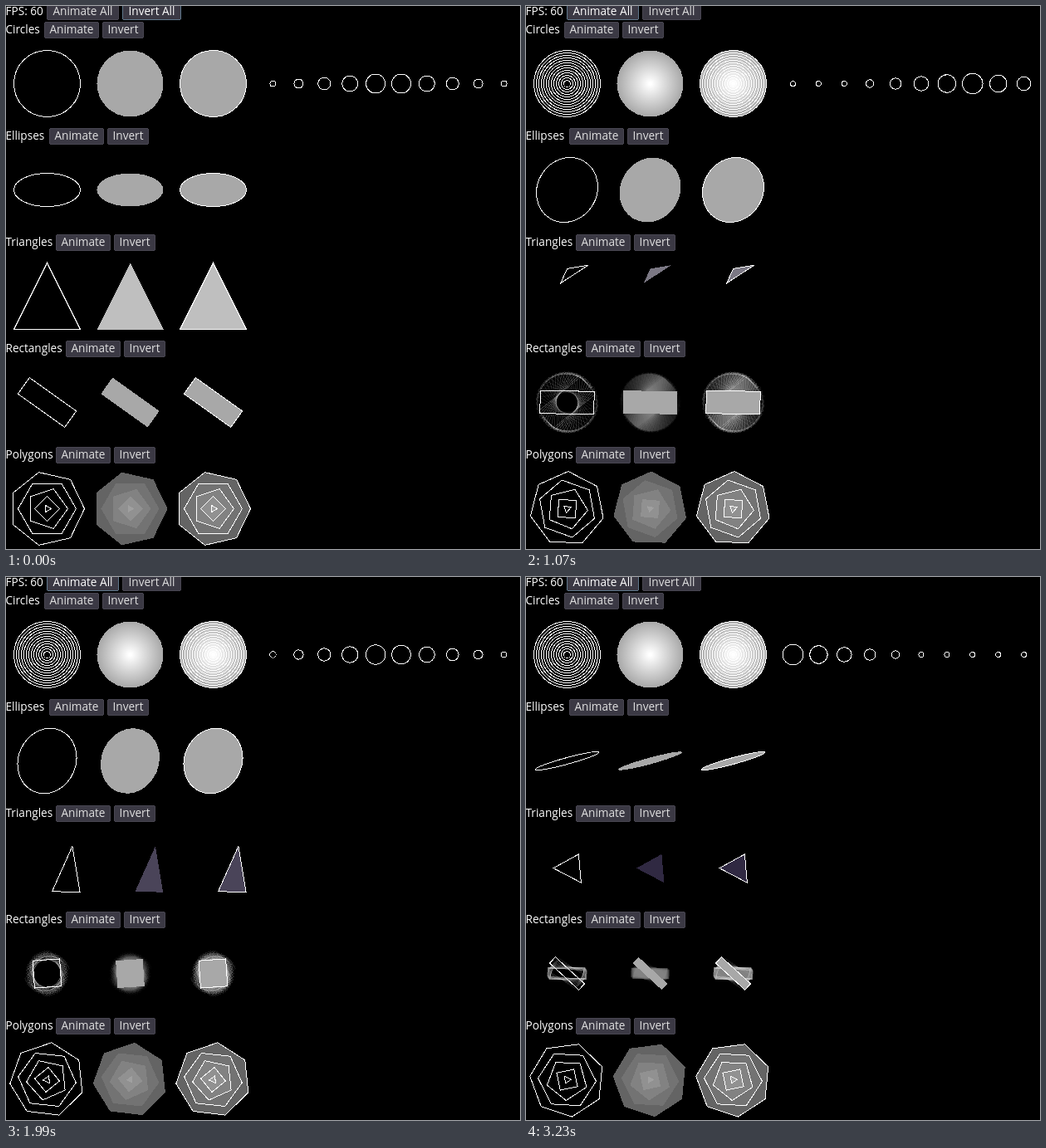
An HTML page for the animation above (3280 ms loop, 619x654 px).

```html
<!DOCTYPE html>
<html lang="en">
<meta charset="utf-8">
<title>Shape drawing demo</title>
<style>
  html, body { margin: 0; width: 100%; height: 100%; overflow: hidden; background: #000; }
  svg { display: block; font: 13.6px "Open Sans", "Noto Sans", sans-serif; }
  #scene, rect { shape-rendering: crispEdges; }
  text { fill: #fff; }
  .button rect { fill: #3b3944; stroke: #484651; }
  .button text { fill: #e0e0e0; text-anchor: middle; }
  .focused rect { stroke: #60788c; }
  .focused text { fill: #fff; }
</style>
<svg width="619" height="654">
  <defs>
    <radialGradient id="glow">
      <stop offset="0.04" stop-color="#fff"/>
      <stop offset="1" stop-color="#a8a8a8"/>
    </radialGradient>
  </defs>
  <g id="controls"></g>
  <g id="scene" transform="translate(.5 .5)"></g>
</svg>
<script>
const { sin, cos, exp, max, abs, floor, PI } = Math;
const controls = document.getElementById('controls');
const scene = document.getElementById('scene');
const LOOP = 3280, CLICK = 350, START = 425;
const GREY = '#a8a8a8', WHITE = '#fff', DEG = PI / 180;

const button = (label, x, y, w) => `<g class="button">
  <rect x="${x + 0.5}" y="${y - 8.5}" width="${w - 1}" height="19" rx="2"/>
  <text x="${x + w / 2}" y="${y + 5}">${label}</text></g>`;
const heading = (label, y) => `<text x="-.5" y="${y + 5}">${label}</text>`;

function buildControls() {
  const rows = { Circles: 46, Ellipses: 52, Triangles: 60, Rectangles: 72, Polygons: 60 };
  const sections = Object.entries(rows).map(([name, x], i) => {
    const y = 28 + 128 * i;
    return heading(name, y) + button('Animate', x, y, 66) + button('Invert', x + 70, y, 50);
  });
  controls.innerHTML = heading('FPS: 60', 6) + button('Animate All', 49, 6, 87) +
    button('Invert All', 140, 6, 71) + sections.join('');
}

const style = (fill, stroke) => `fill="${fill || 'none'}" stroke="${stroke || 'none'}"`;
const circle = (x, y, r, fill, stroke) =>
  `<circle cx="${x}" cy="${y}" r="${r}" ${style(fill, stroke)}/>`;
const polygon = (points, fill, stroke) =>
  `<polygon points="${points.join(' ')}" ${style(fill, stroke)}/>`;

// Outline, fill, and both, side by side.
const columns = draw => [0, 1, 2].map(i =>
  `<g transform="translate(${100 * i})">${draw(i > 0, i !== 1)}</g>`).join('');

function circles(t) {
  const ringed = t > 0.075 && floor((t - 0.075) / 0.61) % 2 === 0;
  let out = columns((filled, lined) => {
    let disc = filled ? circle(49, 93, 40, ringed ? 'url(#glow)' : GREY) : '';
    if (lined) {
      for (let r = 40; r >= (ringed ? 4 : 40); r -= 3) disc += circle(49, 93, r, null, WHITE);
    }
    return disc;
  });
  const peak = 4.5 + 4.5 * sin(4 * t);
  for (let i = 0; i < 10; i++) {
    out += circle(321 + 30.9 * i, 93, max(3, 12.5 - 2 * abs(i - peak)), null, WHITE);
  }
  return out;
}

function ellipses(t) {
  const minor = 20 + 19.5 * sin(84 * DEG * t);
  return columns((filled, lined) => `<ellipse rx="40" ry="${minor}"
    transform="translate(49 221) rotate(${187 * t})" ${style(filled && GREY, lined && WHITE)}/>`);
}

// Each corner drifts on its own; the fill fades to dark violet.
function triangles(t) {
  const points = [
    [34 * sin(1.3 * t), -40 * cos(0.57 * t)],
    [5 * t - 40 * exp(-2 * t), 40 * exp(-0.2 * t) * cos(2.5 * t + t * t)],
    [18 + 22 * cos(3.9 * t), 40 * exp(-0.15 * t) * cos(4.2 * t)]
  ].map(([x, y]) => [49 + x, 349 + y]);
  const color = `rgb(${[35, 27, 55].map(c => c + (191 - c) * exp(-t / 1.13))})`;
  return columns((filled, lined) => polygon(points, filled && color, lined && WHITE));
}

function bar(t, tilt, fill, stroke) {
  const w = 49 + 22 * cos(1.8 * t - 0.4), h = 24 + 7 * t * sin(1.4 * t);
  const turn = tilt + 360 * sin(1.75 * t);
  return `<rect x="${-w / 2}" y="${-h / 2}" width="${w}" height="${h}"
    transform="translate(49 477) rotate(${turn})" ${style(fill, stroke)}/>`;
}

// A spinning bar over the fading trail of its last moments.
function rectangles(t) {
  const trail = 22;
  return columns((filled, lined) => {
    let out = '';
    for (let k = trail; k > 0; k--) {
      const past = t - k / 60, fade = 1 - k / (trail + 2);
      if (past < 0) continue;
      out += bar(past, 0,
        filled && `rgba(168,168,168,${0.12 * fade})`,
        lined && `rgba(255,255,255,${0.06 + 0.14 * fade})`);
    }
    return out + bar(t, 35.5, filled && GREY, lined && WHITE);
  });
}

// Nested shapes with ever fewer sides, turning in alternate directions.
function polygons(t) {
  return columns((filled, lined) => {
    let out = '';
    for (let sides = 7; sides > 2; sides--) {
      const r = 10 * sides - 25, way = sides % 2 ? 1 : -1;
      const points = Array.from({ length: sides }, (_, i) => {
        const a = (way * 341 * t + 360 * i / sides) * DEG;
        return [49 + r * cos(a), 605 + r * sin(a)];
      });
      const shade = 100 + 15 * (7 - sides);
      out += polygon(points, filled && `rgb(${shade},${shade},${shade})`, lined && WHITE);
    }
    return out;
  });
}

buildControls();
const [animateAll, invertAll] = controls.querySelectorAll('.button');
const origin = performance.now();

function frame() {
  const now = (performance.now() - origin) % LOOP;
  const t = max(0, now - START) / 1000;
  animateAll.classList.toggle('focused', now >= CLICK);
  invertAll.classList.toggle('focused', now < CLICK);
  scene.innerHTML = [circles, ellipses, triangles, rectangles, polygons].map(draw => draw(t)).join('');
  requestAnimationFrame(frame);
}
frame();
</script>
</html>
```
